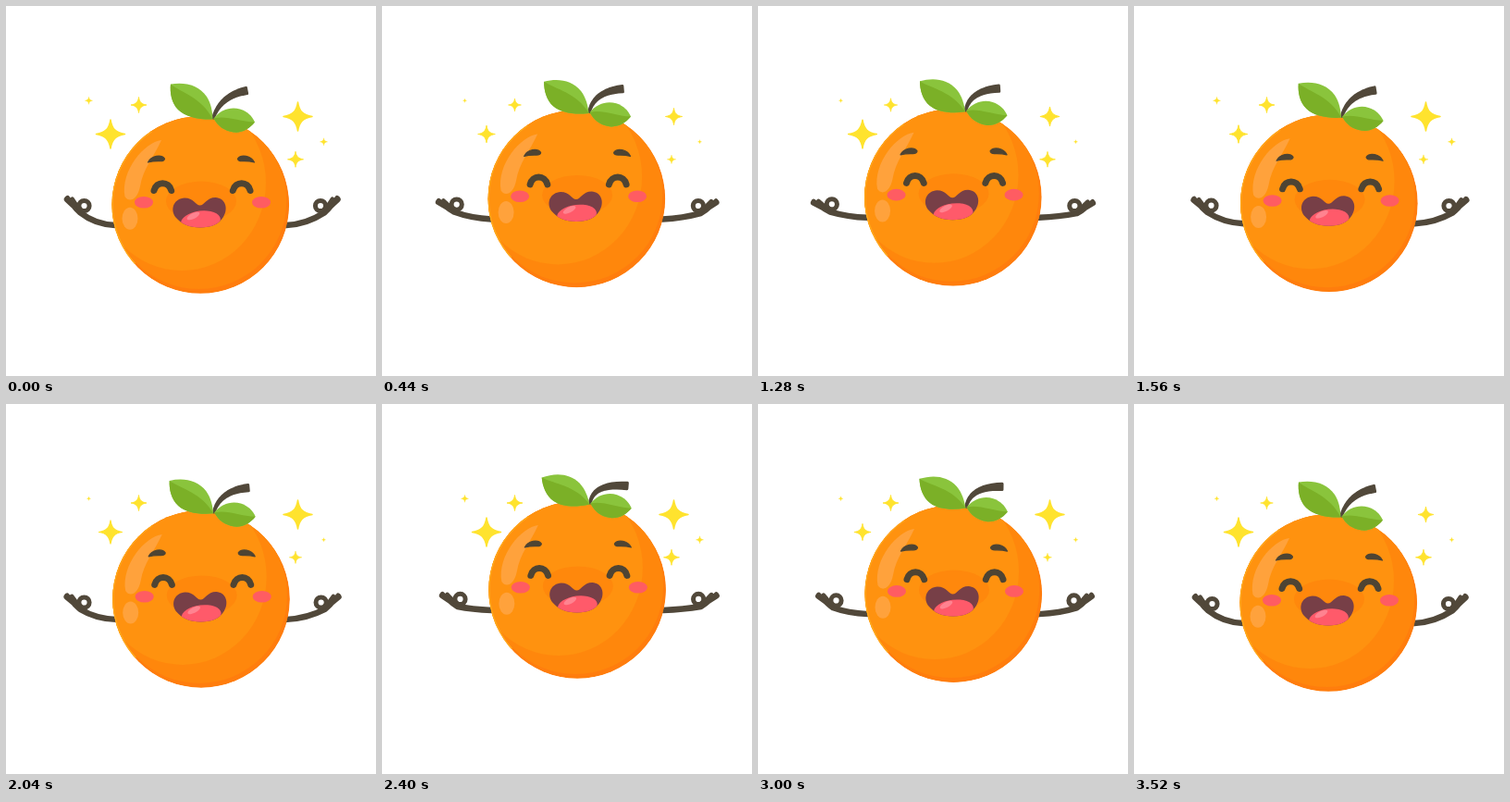
An HTML page for the animation above (3.6 s loop, 400x400 px).

```html
<!DOCTYPE html>
<html lang="en">
<head>
<meta charset="utf-8">
<title>Happy orange</title>
<style>
html, body { margin: 0; width: 100%; height: 100%; overflow: hidden; background: #fff; }
svg { display: block; width: 100vw; height: 100vh; }
</style>
</head>
<body>
<svg viewBox="0 0 400 400">
  <defs>
    <clipPath id="skin"><circle cx="210.300" cy="215" r="95.800"/></clipPath>
    <clipPath id="lips"><path id="lipShape" d="M209.700 215.500C205 215.500 203 207.500 193 207.500C182 208 177 219 183 228C190 236 198 239.500 210 239.500C222 239.500 230 236 235 228C241 218 236.500 207.500 226.500 207C217 207 214.500 215.500 209.700 215.500Z"/></clipPath>
  </defs>
  <g id="stars" fill="#ffe32e" stroke="#ffe32e" stroke-width=".1" stroke-linejoin="round"></g>
  <g id="arms" fill="none" stroke="#51483a" stroke-linecap="round" stroke-linejoin="round"></g>
  <g id="fruit">
    <g clip-path="url(#skin)">
      <circle cx="210.300" cy="215" r="96" fill="#ff7d0d"/>
      <circle cx="208.300" cy="211" r="95" fill="#ff870c"/>
      <ellipse cx="190" cy="191" rx="91" ry="95" fill="#ff920f"/>
      <path d="M157 135A95.800 95.800 0 0 0 139 279" fill="none" stroke="#ffaa1c" stroke-width="3"/>
    </g>
    <path d="M168 145C150 147 123.500 178 128.500 206C133 213 142 210 145 195C148 176 160 163 168 145Z" fill="#ffa23c"/>
    <ellipse cx="134" cy="229.700" rx="8.500" ry="12" fill="#ffa23c"/>
    <ellipse cx="211" cy="211" rx="38" ry="21.500" fill="#ff880c"/>
    <g fill="#4e4433" stroke="#4e4433" stroke-width="1.200" stroke-linejoin="round">
      <path d="M153.500 169C157 161.500 168 160 171.500 165Q171.500 168 166 167.700Q159 167.500 153.500 169Z"/>
      <path d="M268.500 169C265 161.500 254 160 250.500 165Q250.500 168 256 167.700Q263 167.500 268.500 169Z"/>
    </g>
    <g fill="none" stroke="#4e4433" stroke-width="7" stroke-linecap="round">
      <path d="M160 199.500C162.500 189 176 189 178.700 199.500"/>
      <path d="M245.300 199.500C248 189 261.500 189 264 199.500"/>
    </g>
    <g fill="#ff5c62">
      <ellipse cx="149" cy="212.300" rx="10" ry="6.300"/>
      <ellipse cx="276" cy="212.300" rx="10" ry="6.300"/>
    </g>
    <use href="#lipShape" fill="#773f47"/>
    <g clip-path="url(#lips)">
      <ellipse cx="210.500" cy="232.500" rx="21.500" ry="11" transform="rotate(-7 210.500 232.500)" fill="#ff5a6a"/>
      <ellipse cx="202.500" cy="227" rx="7.500" ry="3" transform="rotate(-27 202.500 227)" fill="#ff8390"/>
    </g>
    <path id="stem" fill="#51483a" stroke="#51483a" stroke-width="3" stroke-linejoin="round"/>
    <g id="leafL">
      <path d="M178 84.500C193 82 208 85 217 98C222 106 223 114 223.500 122.500C208 123 194 120 186 112C179 105 177 94 178 84.500Z" fill="#8ac43c"/>
      <path d="M178 84.500C190 94 212 99 223.500 122.500C208 123 194 120 186 112C179 105 177 94 178 84.500Z" fill="#7bb027"/>
    </g>
    <g id="leafR">
      <path d="M224.500 121.500C232 112 243 108.500 253 111.500C261 114 266 119 269 125.500C263 133 255 137.500 246 136.500C236 135 229 130 224.500 121.500Z" fill="#8ac43c"/>
      <path d="M224.500 121.500C238 118 252 125 269 125.500C263 133 255 137.500 246 136.500C236 135 229 130 224.500 121.500Z" fill="#7bb027"/>
    </g>
  </g>
</svg>
<script>
const LOOP = 3600, STEP = 40, LAST = 3520, HALF = 870;
const NS = 'http://www.w3.org/2000/svg';
const $ = id => document.getElementById(id);
const add = (parent, tag, attrs = {}) => {
  const el = document.createElementNS(NS, tag);
  for (const k in attrs) el.setAttribute(k, attrs[k]);
  return parent.appendChild(el);
};
const lerp = (a, b, p) => a + (b - a) * p;
const mix = (a, b, p) => a.map((v, i) => lerp(v, b[i], p));
const smooth = x => x * x * (3 - 2 * x);

function keyed(keys, t) {
  let i = 1;
  while (i < keys.length - 1 && t > keys[i][0]) i++;
  const [t0, a] = keys[i - 1], [t1, b] = keys[i];
  const p = Math.min(1, Math.max(0, (t - t0) / (t1 - t0)));
  return lerp(a, b, smooth(p));
}

// Rise of one hop, 0 to 1, around its peak time
const hop = (t, peak) => {
  const d = Math.abs(t - peak);
  return d < HALF ? (1 + Math.cos(Math.PI * d / HALF)) / 2 : 0;
};
const pulse = (t, period) => smooth((1 + Math.cos(2 * Math.PI * t / period)) / 2);
const sway = [[0, 0], [1560, .6], [3000, 1], [3480, 0]];
const glow = [[0, 1], [360, .08], [1200, 0], [1450, 1], [3150, 1], [3420, 0]];

// Each hop: height, leaf turn, stem control and end, hand offset and turn
const restStem = [8, -24, 36, -29.5];
const hops = [
  { peak: 890, lift: 14, leaf: 10, stem: [2, -20, 36, -19.5], left: [-8, -3, 28], right: [4, 0, 21] },
  { peak: 2620, lift: 16.5, leaf: 12.5, stem: [3, -21, 41, -16.5], left: [0, -6, 11], right: [2.5, -6, 12] }
];

const beats = [t => pulse(t, 1160), t => keyed(glow, t), t => pulse(t, 815)];
const stars = [
  [113, 138.5, 15.5, .58, 0], [313, 165.8, 8.5, .52, 0],
  [315.5, 119.5, 15.5, .55, 1], [143.5, 107, 8.5, .8, 1],
  [89.5, 102.3, 4, .55, 2], [343.5, 146.8, 4, .55, 2]
].map(([x, y, r, min, beat]) => ({
  x, y, r, min, beat,
  el: add($('stars'), 'path', { d: 'M0-1C.1-.36.36-.1 1 0C.36.1.1.36 0 1C-.1.36-.36.1-1 0C-.36-.1-.1-.36 0-1Z' })
}));

const makeArm = (x, y, side) => ({
  x, y, side,
  line: add($('arms'), 'path', { 'stroke-width': 6.5 }),
  finger: add($('arms'), 'path', { 'stroke-width': 5 }),
  ring: add($('arms'), 'circle', { r: 5.6, 'stroke-width': 5 })
});
const armL = makeArm(84.5, 216, 1), armR = makeArm(340, 216, -1);

function drawArm(arm, [dx, dy, turn], p, sx, sy) {
  const cx = arm.x + dx * p, cy = arm.y + dy * p;
  const a = turn * p * Math.PI / 180, c = Math.cos(a), s = Math.sin(a);
  const at = (x, y) => [cx + arm.side * (x * c + y * s), cy - x * s + y * c].map(v => v.toFixed(2)).join(' ');
  arm.line.setAttribute('d', `M${at(-18.5, -7)}L${at(-11, 0)}Q${at(-9, 3)} ${at(-4, 7.5)}Q${sx - arm.side * 22} ${sy - 1} ${sx} ${sy}`);
  arm.finger.setAttribute('d', `M${at(-18, -8.5)}L${at(-15, -4)}M${at(-13, -7)}L${at(-9, -1)}L${at(-4, 4)}`);
  arm.ring.setAttribute('cx', cx);
  arm.ring.setAttribute('cy', cy);
}

function drawStem([qx, qy, ex, ey]) {
  const up = [], down = [], n = 12;
  for (let i = 0; i <= n; i++) {
    const u = i / n, v = 1 - u;
    const x = 224 + 2 * u * v * qx + u * u * ex;
    const y = 121 + 2 * u * v * qy + u * u * ey;
    const tx = v * qx + u * (ex - qx), ty = v * qy + u * (ey - qy);
    const w = lerp(.3, 3.2, u) / Math.hypot(tx, ty);
    up.push([x - ty * w, y + tx * w]);
    down.unshift([x + ty * w, y - tx * w]);
  }
  $('stem').setAttribute('d', 'M' + up.concat(down).map(q => q.map(v => v.toFixed(2)).join(' ')).join('L') + 'Z');
}

function draw(ms) {
  const t = Math.min(LAST, Math.floor(ms % LOOP / STEP) * STEP);
  const h = hops[t < 1755 ? 0 : 1];
  const p = hop(t, h.peak), lift = h.lift * p, dx = keyed(sway, t);

  $('fruit').setAttribute('transform', `translate(${dx} ${-lift})`);
  drawStem(mix(restStem, h.stem, p));
  $('leafL').setAttribute('transform', `rotate(${-h.leaf * p} 223.5 122)`);
  $('leafR').setAttribute('transform', `rotate(${2 * p} 224.5 121.5)`);
  drawArm(armL, h.left, p, 118 + dx, 237 - lift);
  drawArm(armR, h.right, p, 303 + dx, 237 - lift);

  for (const s of stars) {
    const r = s.r * lerp(s.min, 1, beats[s.beat](t));
    s.el.setAttribute('transform', `translate(${s.x} ${s.y}) scale(${r})`);
  }
}

const start = performance.now();
function tick() {
  draw(performance.now() - start);
  requestAnimationFrame(tick);
}
tick();
</script>
</body>
</html>
```
